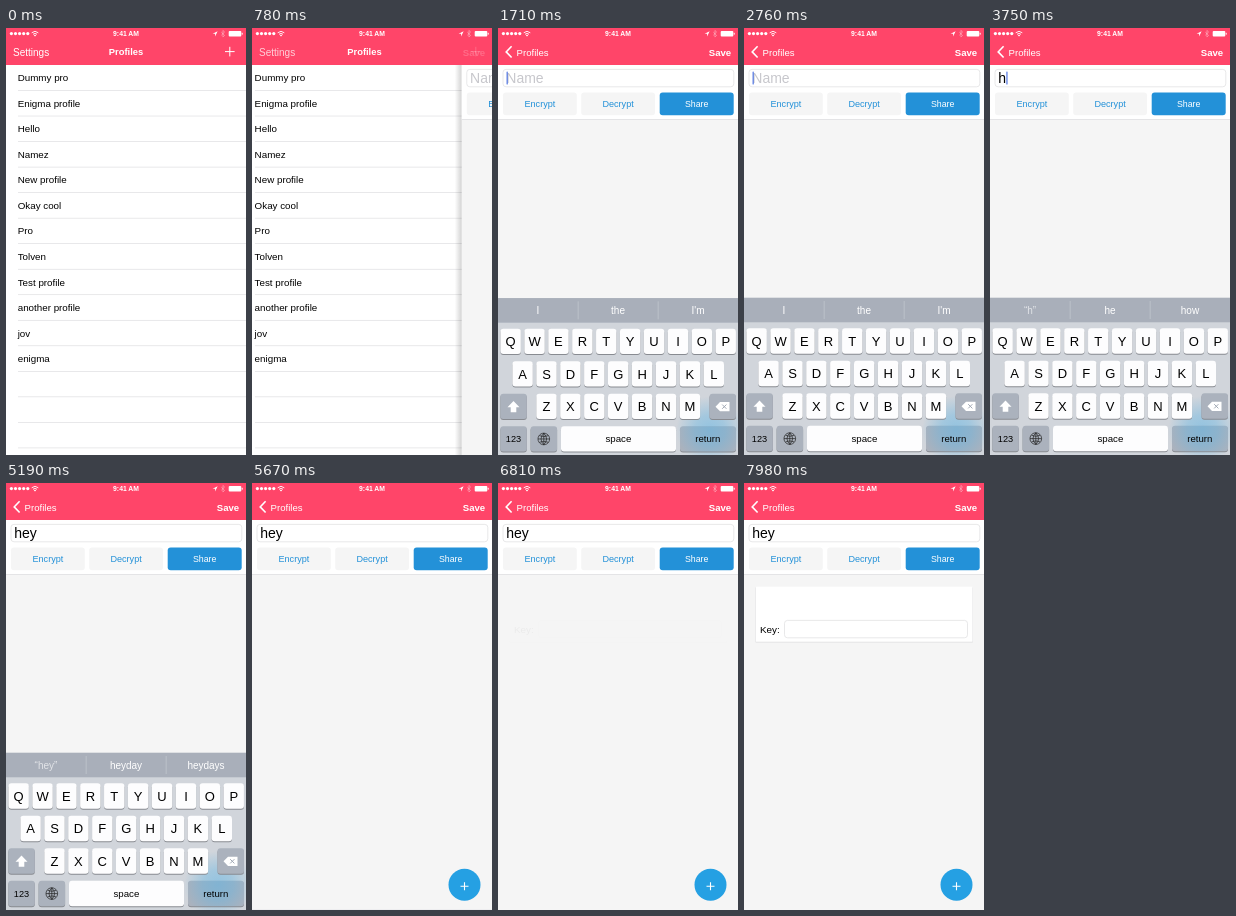
Animation, 240 px wide and 427 px high, one loop 8000 ms. Source, as an HTML page:

```html
<!DOCTYPE html>
<html lang="en">
<head>
<meta charset="utf-8">
<title>Profiles</title>
<style>
html, body { margin: 0; width: 100%; height: 100%; overflow: hidden; background: #fff; }
svg { display: block; width: 100%; height: 100%; }
text { font-family: "Liberation Sans", Arial, sans-serif; white-space: pre; }
</style>
</head>
<body>
<svg viewBox="0 0 240 427">
  <defs>
    <linearGradient id="edge">
      <stop offset="0" stop-color="#000" stop-opacity="0"/>
      <stop offset="1" stop-color="#000" stop-opacity=".2"/>
    </linearGradient>
    <radialGradient id="glow" gradientUnits="userSpaceOnUse" cx="212" cy="402" r="34">
      <stop offset="0" stop-color="#5fb4e4" stop-opacity=".55"/>
      <stop offset=".45" stop-color="#5fb4e4" stop-opacity=".4"/>
      <stop offset="1" stop-color="#5fb4e4" stop-opacity="0"/>
    </radialGradient>
  </defs>
  <g id="list"></g>
  <g id="page"></g>
  <g id="keyboard"></g>
  <g id="bar"></g>
</svg>
<script>
const LOOP = 8000, TAP = 640, PUSH = 747, KEYS_IN = 1250, KEYS_OUT = 5260, CARD = 6800;
const BLUE = '#2391d8';
const $ = id => document.getElementById(id);

const label = (x, y, size, str, fill = '#000', extra = '') =>
  `<text x="${x}" y="${y}" font-size="${size}" fill="${fill}" ${extra}>${str}</text>`;
const mid = (x, y, size, str, fill, extra = '') =>
  label(x, y, size, str, fill, `text-anchor="middle" ${extra}`);
const box = (x, y, w, h, fill, r = 0, extra = '') =>
  `<rect x="${x}" y="${y}" width="${w}" height="${h}" rx="${r}" fill="${fill}" ${extra}/>`;
const line = (d, color, width, extra = '') =>
  `<path d="${d}" fill="none" stroke="${color}" stroke-width="${width}" ${extra}/>`;

function buildList() {
  const names = ['Dummy pro', 'Enigma profile', 'Hello', 'Namez', 'New profile', 'Okay cool',
    'Pro', 'Tolven', 'Test profile', 'another profile', 'jov', 'enigma'];
  let s = box(0, 0, 320, 427, '#fff');
  for (let i = 0; i < 15; i++) {
    const y = 37 + 25.53 * i;
    if (names[i]) s += label(11.7, y + 16.3, 9.8, names[i]);
    s += box(12, y + 25.2, 300, .6, '#d9d9dc');
  }
  $('list').innerHTML = s;
}

function buildPage() {
  const field = 'stroke="#e2e2e4" stroke-width=".8"';
  $('page').innerHTML =
    box(-7, 37, 7, 390, 'url(#edge)', 0, 'id="shade"') +
    box(0, 37, 240, 390, '#f5f5f5') + box(0, 37, 240, 54.5, '#fff') +
    box(0, 91.3, 240, .7, '#dcdcde') +
    box(5, 41.4, 230.8, 17.4, '#fff', 3, field) +
    label(8.3, 55, 14, 'Name', '#c7c7cc', 'id="hint"') +
    label(8.3, 55, 14, '', '#000', 'id="name"') +
    box(0, 43.5, 1.1, 13, '#4169e0', .5, 'id="caret"') +
    box(5, 64.5, 73.8, 22.7, '#f5f5f5', 3) + mid(41.9, 79, 9.1, 'Encrypt', BLUE) +
    box(83.2, 64.5, 73.8, 22.7, '#f5f5f5', 3) + mid(120.1, 79, 9.1, 'Decrypt', BLUE) +
    box(161.7, 64.5, 74, 22.7, BLUE, 3) + mid(198.7, 79, 8.8, 'Share', '#fff') +
    '<g id="card">' +
      box(11.5, 104, 217.4, 55.6, '#dedee0', .5) + box(11.9, 103.8, 216.6, 55, '#fff', .5) +
      label(16, 149.5, 9.9, 'Key:') + box(40.5, 137.4, 183, 17.4, '#fff', 3, field) +
    '</g>' +
    '<circle cx="212.5" cy="401.8" r="16" fill="#25a0e3"/>' +
    line('M208.5 403.2h8M212.5 399.2v8', '#fff', 1.1);
}

function buildKeyboard() {
  const cap = (x, y, w, fill = '#fdfdfe') =>
    box(x, y + 1, w, 25.4, '#888b91', 3) + box(x, y, w, 25.4, fill, 3);
  const grey = '#abb2bd';
  let s = box(0, 270, 240, 157, '#d1d5db') + box(0, 269.7, 240, 24.6, '#a9afba');
  s += box(79.8, 273, .6, 18, '#c9cdd4') + box(159.8, 273, .6, 18, '#c9cdd4');
  for (let i = 0; i < 3; i++) s += mid(40 + 80 * i, 285.6, 10, '', '#fff', `id="word${i}"`);
  s += box(170, 294.3, 70, 132.7, 'url(#glow)');
  ['QWERTYUIOP', 'ASDFGHJKL', 'ZXCVBNM'].forEach((row, r) => {
    const y = 300.3 + 32.5 * r, n = row.length;
    [...row].forEach((c, i) => {
      const x = 120.2 + (i - (n - 1) / 2) * 23.9;
      s += cap(x - 10.2, y, 20.4) + mid(x, y + 17.6, 13, c);
    });
  });
  s += cap(2.3, 365.3, 26.5, grey) + cap(211.5, 365.3, 26.5, grey) +
    cap(2.3, 397.8, 26.5, grey) + cap(32.6, 397.8, 26.5, grey) +
    cap(63, 397.8, 115, '#fdfdfe') + cap(182, 397.8, 56, grey) +
    box(182, 397.8, 56, 25.4, 'url(#glow)', 3);
  s += '<path d="M15.5 372.6l6 6.2h-3.2v5h-5.6v-5h-3.2z" fill="#fff"/>' +
    '<path d="M217.5 378.3l4.5-4.6h9.5v9.2h-9.5z" fill="#fff"/>' +
    line('M224.2 376.2l4.2 4.2m0-4.2l-4.2 4.2', '#a0a8b4', 1);
  s += line('M45.8 404.8a5.8 5.8 0 1 0 .01 0zM45.8 404.8v11.6M40 410.6h11.6' +
    'M45.8 404.8q-5.6 5.8 0 11.6q5.6 -5.8 0 -11.6M41.5 407.3q4.3 2 8.6 0M41.5 413.9q4.3 -2 8.6 0',
    '#222', .7);
  s += mid(15.5, 413.8, 9.2, '123') + mid(120.4, 413.6, 9.7, 'space') + mid(209.8, 413.6, 9.6, 'return');
  $('keyboard').innerHTML = s;
}

function buildBar() {
  let s = box(0, 0, 240, 37, '#ff4569');
  for (let i = 0; i < 5; i++) s += `<circle cx="${5.4 + 4.1 * i}" cy="5.6" r="1.6" fill="#fff"/>`;
  s += line('M25.7 4.8q3.3-3 6.6 0M27 6.3q2-1.8 4 0', '#fff', .9) +
    '<path d="M27.8 7.2q1.2-1 2.4 0l-1.2 1.3z" fill="#fff"/>' +
    mid(120, 8, 6.8, '9:41 AM', '#fff', 'font-weight="bold"') +
    '<path d="M211.6 3.2l-5 2.6h2.5v2.6z" fill="#fff"/>' +
    line('M215.2 4l3.4 3.4l-1.7 1.6v-6.6l1.7 1.6l-3.4 3.4', '#fff', .5, 'opacity=".65"') +
    box(222.7, 3, 12.6, 5.4, '#fff', 1) + box(235.7, 4.7, 1, 2, '#fff', .4);
  s += label(7, 27.5, 10, 'Settings', '#fff', 'id="settings"') +
    mid(0, 27.4, 9.4, 'Profiles', '#fff', 'id="title" font-weight="bold"') +
    line('M219 23.6h9.6M223.8 18.8v9.6', '#fff', 1, 'id="plus"') +
    line('M13.6 18.3l-5.4 5.6l5.4 5.6', '#fff', 1.6, 'id="chevron"') +
    label(0, 27.5, 9.6, 'Profiles', '#fff', 'id="back"') +
    label(210.8, 27.5, 9.6, 'Save', '#fff', 'id="save" font-weight="bold"');
  $('bar').innerHTML = s;
}

// Time of each state of the text field, with its width and suggestions
const typed = [
  { at: KEYS_IN, text: '', width: 0, words: ['I', 'the', "I'm"] },
  { at: 3550, text: 'h', width: 7.8, words: ['“h”', 'he', 'how'] },
  { at: 4150, text: 'he', width: 15.6, words: ['“he”', 'hey', 'her'] },
  { at: 4600, text: 'hey', width: 22.6, words: ['“hey”', 'heyday', 'heydays'] }
];

const clamp = v => Math.max(0, Math.min(1, v));
const fade = (id, v) => $(id).setAttribute('opacity', clamp(v));
const move = (id, x, y) => $(id).setAttribute('transform', `translate(${x} ${y})`);

// Critically damped spring from 0 to 1
function spring(ms) {
  if (ms <= 0) return 0;
  const a = ms * .018;
  return a > 10 ? 1 : 1 - (1 + a) * Math.exp(-a);
}

function draw(t) {
  const p = spring(t - PUSH);
  move('list', -72 * p, 0);
  move('page', 240 * (1 - p), 0);
  fade('shade', t > PUSH ? 1 - p : 0);

  $('title').setAttribute('x', 120 - 60 * p);
  $('back').setAttribute('x', 18.6 + 60 * (1 - p));
  fade('title', 1 - 2 * Math.max(0, p - .12));
  if (p > .6) fade('title', 0);
  fade('settings', 1 - 2 * p);
  fade('plus', (t < TAP ? 1 : .25) * (1 - 2 * p));
  fade('back', 2 * p - 1);
  fade('chevron', 2 * p - 1);
  fade('save', p < .5 ? p * 1.6 : .8 + (p - .5) * .4);

  const up = spring(t - KEYS_IN) - spring(t - KEYS_OUT);
  move('keyboard', 0, 158 * (1 - up));

  const now = typed.filter(s => s.at <= t).pop() || typed[0];
  $('name').textContent = now.text;
  fade('hint', now.text ? 0 : 1);
  now.words.forEach((w, i) => { $('word' + i).textContent = w; });
  fade('word0', now.text ? .65 : 1);
  $('caret').setAttribute('x', 8.6 + now.width);
  fade('caret', t >= KEYS_IN && t < KEYS_OUT && (t - now.at) % 1000 < 540 ? 1 : 0);

  fade('card', (t - CARD) / 300);
}

buildList();
buildPage();
buildKeyboard();
buildBar();

const start = performance.now();
function tick() {
  draw((performance.now() - start) % LOOP);
  requestAnimationFrame(tick);
}
tick();
</script>
</body>
</html>
```
